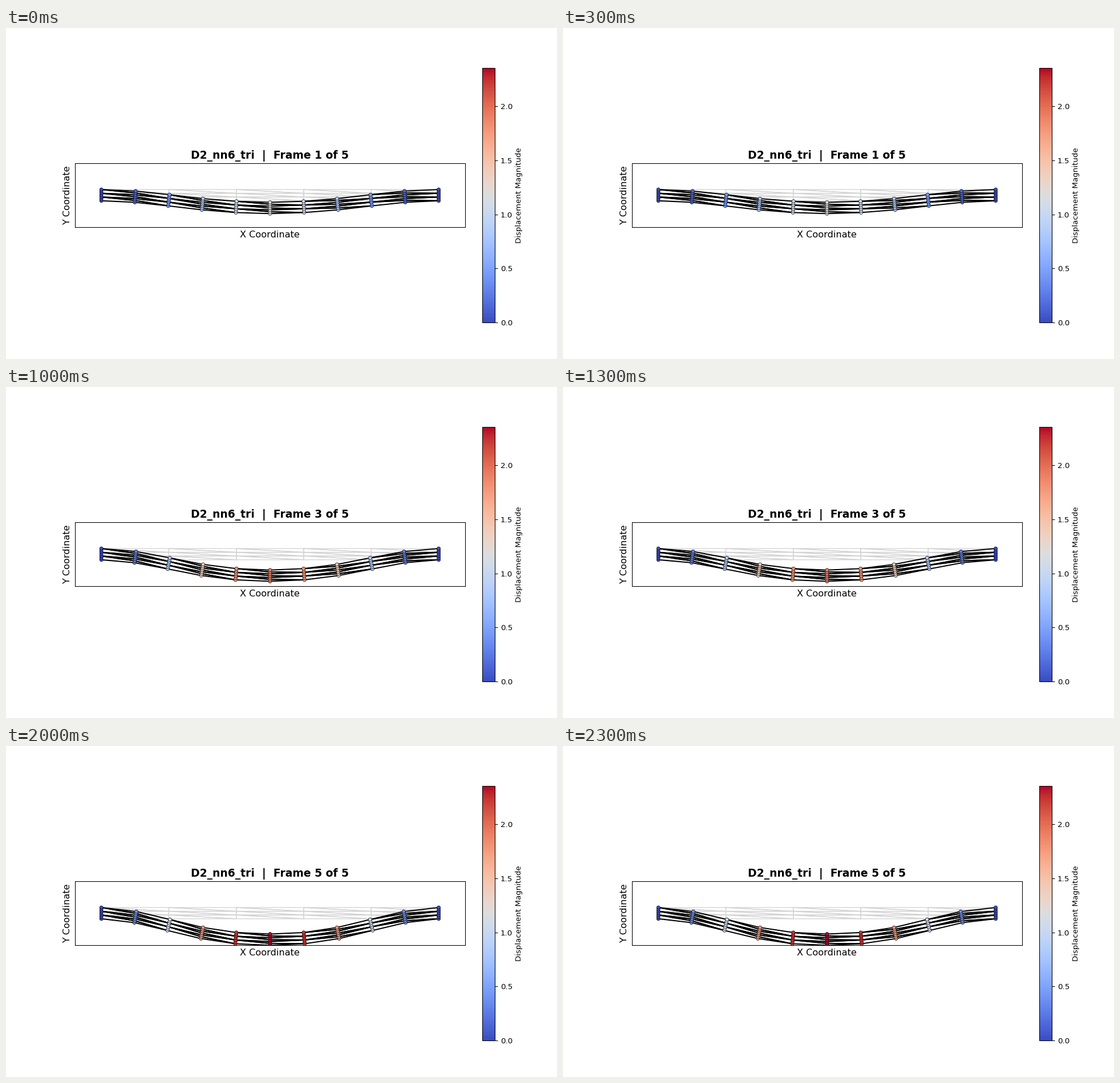
A matplotlib script for the animation above (2.5 s loop, 966x580 px).

```python
import numpy as np
import matplotlib.pyplot as plt
from matplotlib.animation import FuncAnimation
from matplotlib.cm import ScalarMappable
from matplotlib.collections import LineCollection
from matplotlib.colors import Normalize

S = 0.966  # scale of all point sizes
STEPS = 5
LENGTH, HEIGHT = 30.0, 1.0
NX, NY = 5, 3  # quadratic triangle pairs along each side
PEAK = 2.357   # largest deflection

plt.rcParams.update({
    "font.family": "DejaVu Sans",
    "font.size": 10 * S,
    "axes.linewidth": 0.8 * S,
    "axes.titlepad": 6 * S,
    "axes.labelpad": 4 * S,
    "ytick.major.size": 3.5 * S,
    "ytick.major.width": 0.8 * S,
    "ytick.major.pad": 3.5 * S,
})

xs = np.linspace(0, LENGTH, 2 * NX + 1)
ys = np.linspace(0, HEIGHT, 2 * NY + 1)
X, Y = np.meshgrid(xs, ys)
dx = xs[1] - xs[0]

# Half profiles of the clamped beam, bending-led and tension-led
SOFT = np.array([0, 0.12, 0.40, 0.708, 0.917, 1])
STIFF = np.array([0, 0.148, 0.446, 0.75, 0.942, 1])


def triangles():
    """Closed outlines through corner and midside nodes, as (row, col)."""
    lower = [(0, 0), (0, 1), (0, 2), (1, 1), (2, 0), (1, 0), (0, 0)]
    upper = [(2, 2), (2, 1), (2, 0), (1, 1), (0, 2), (1, 2), (2, 2)]
    return np.array([[(2 * j + r, 2 * i + c) for r, c in tri]
                     for i in range(NX) for j in range(NY)
                     for tri in (lower, upper)])


TRIS = triangles()


def outlines(x, y):
    rows, cols = TRIS[..., 0], TRIS[..., 1]
    return np.stack([x[rows, cols], y[rows, cols]], axis=-1)


def amplitude(load):
    """Relative peak deflection of a beam that stiffens as it stretches."""
    roots = np.roots([0.766, 0, 0.234, -load])
    return roots[np.argmin(abs(roots.imag))].real


def deform(load):
    a = amplitude(load)
    mix = (a - 0.484) / 0.516
    half = SOFT + mix * (STIFF - SOFT)
    w = PEAK * a * np.concatenate([half, half[-2::-1]])
    shorten = np.diff(w) ** 2 / (2 * dx)
    u = np.concatenate([[0], np.cumsum(shorten.mean() - shorten)])
    slope = np.gradient(w, dx)
    slope[[0, -1]] = 0
    angle = np.arctan(slope)
    arm = Y - HEIGHT / 2
    return X + u + arm * np.sin(angle), HEIGHT / 2 + arm * np.cos(angle) - w


fig, ax = plt.subplots(figsize=(9.66, 5.80), dpi=100)
norm = Normalize(0, PEAK)
bar = fig.colorbar(ScalarMappable(norm, "coolwarm"), ax=ax,
                   fraction=0.046, pad=0.04)
bar.set_label("Displacement Magnitude")

ax.set_aspect("equal")
ax.set_xlim(-PEAK, LENGTH + PEAK)
ax.set_ylim(-PEAK, HEIGHT + PEAK)
ax.set_xticks([])
ax.set_yticks([])
ax.set_xlabel("X Coordinate", fontsize=12 * S)
ax.set_ylabel("Y Coordinate", fontsize=12 * S)
title = ax.set_title("", fontsize=14 * S, fontweight="bold")

ax.add_collection(LineCollection(outlines(X, Y), colors="lightgray",
                                 linewidths=1.0 * S, zorder=1), autolim=False)
mesh = LineCollection([], colors="black", linewidths=1.5 * S, zorder=2)
ax.add_collection(mesh, autolim=False)
nodes = ax.scatter(X.ravel(), Y.ravel(), c=np.zeros(X.size), s=20 * S ** 2,
                   cmap="coolwarm", norm=norm, edgecolors="black",
                   linewidths=0.5 * S, zorder=3)


def update(i):
    x, y = deform((i + 1) / STEPS)
    mesh.set_segments(outlines(x, y))
    nodes.set_offsets(np.column_stack([x.ravel(), y.ravel()]))
    nodes.set_array(np.hypot(x - X, y - Y).ravel())
    title.set_text(f"D2_nn6_tri  |  Frame {i + 1} of {STEPS}")
    return mesh, nodes, title


anim = FuncAnimation(fig, update, frames=STEPS, interval=500, repeat=True,
                     repeat_delay=0, blit=False)
plt.show()
```
